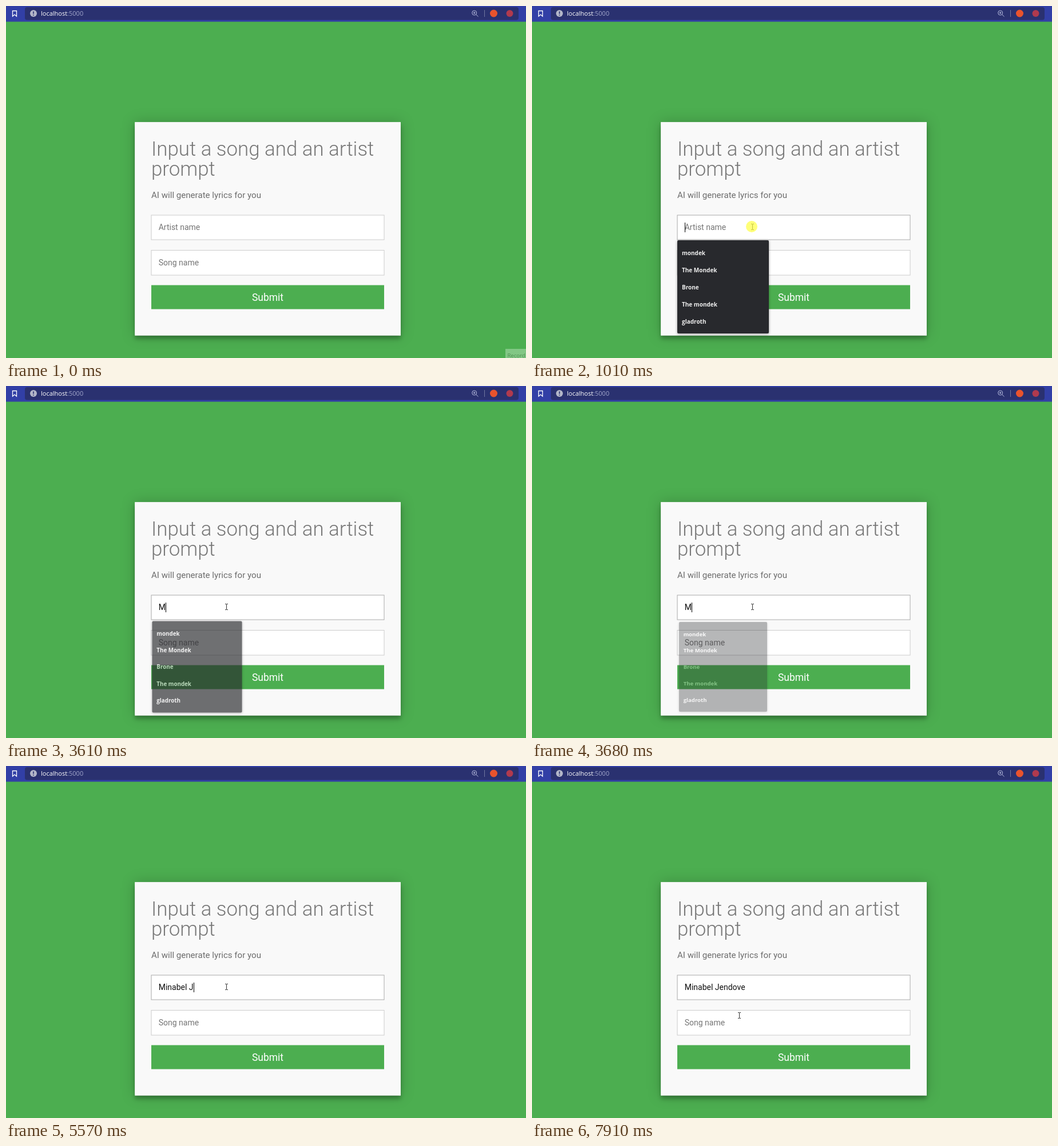
An HTML page that plays this animation: 909x616 px, repeating every 8 s.

```html
<!DOCTYPE html>
<html lang="en">
<head>
<meta charset="utf-8">
<title>Lyrics form</title>
<style>
  html, body { margin: 0; width: 100%; height: 100%; overflow: hidden; background: #4cae50; }
  svg { display: block; width: 909px; height: 616px; font-family: Roboto, sans-serif; }
  text { white-space: pre; }
  .ui { font-family: "Open Sans", sans-serif; }
  .card { fill: #f9f9f9; }
  .glow { filter: drop-shadow(0 0 11.5px rgba(0,0,0,.2)); }
  .drop { filter: drop-shadow(0 6px 3px rgba(0,0,0,.24)); }
  .field { fill: #fff; stroke: #ccc; }
  .field.focus { stroke: #aaa; }
  .entry { font-size: 14px; fill: #757575; }
  .title { font-size: 34.87px; font-weight: 300; fill: #777; }
  #menu { transform-origin: 334px 491.5px; font-size: 10px; font-weight: 700; fill: #eee; }
  #menu rect { fill: #28292d; filter: drop-shadow(0 1px 2px rgba(0,0,0,.4)); }
</style>
</head>
<body>
<svg viewBox="0 0 909 616">
  <rect width="909" height="616" fill="#4cae50"/>

  <g class="ui">
    <rect width="909" height="27.5" fill="#323fa6"/>
    <rect x="33" y="2" width="863" height="22.5" rx="4" fill="#2a3170"/>
    <path d="M11.5 8.5h7v9.5l-3.5-3-3.5 3z" fill="none" stroke="#fff" stroke-width="1.3"/>
    <circle cx="48" cy="13" r="6" fill="#b4b7c9"/>
    <path d="M48 9.5v4.3M48 15.2v1.5" stroke="#2a3170" stroke-width="1.6"/>
    <text x="61" y="17" font-size="11" fill="#fff">localhost<tspan fill="#a3a8cc">:5000</tspan></text>
    <g fill="none" stroke="#b4b9dc">
      <circle cx="818.7" cy="12" r="4"/>
      <path d="M821.7 15l3.8 3.6M816.7 12h4M818.7 10v4"/>
      <path d="M836.5 7v12" stroke="#70769f"/>
    </g>
    <circle cx="852.5" cy="13" r="6.5" fill="#e9532d"/>
    <circle cx="880.5" cy="13" r="6" fill="#b03a4e"/>
  </g>

  <rect class="card glow" x="225.3" y="203.3" width="464.6" height="373.3"/>
  <rect class="card drop" x="225.3" y="203.3" width="464.6" height="373.3"/>
  <text class="title" x="254" y="261.7">Input a song and an artist</text>
  <text class="title" x="254" y="296.5">prompt</text>
  <text x="254" y="336" font-size="15.1" fill="#6c6c6c">AI will generate lyrics for you</text>

  <rect id="artist" class="field" x="254" y="366" width="407" height="43"/>
  <text id="name" class="entry" x="266.7" y="392.3"></text>
  <rect id="caret" y="379" width="1" height="17"/>
  <rect class="field" x="254" y="427.5" width="407" height="43.5"/>
  <text class="entry" x="266.7" y="454.3">Song name</text>
  <rect x="254" y="488.5" width="407" height="42" fill="#4cae50"/>
  <text x="457.5" y="516" font-size="17.43" fill="#fff" text-anchor="middle">Submit</text>

  <g id="menu" class="ui">
    <rect x="254" y="410" width="160" height="163" rx="2"/>
  </g>

  <g id="record" class="ui">
    <rect x="873" y="600" width="36" height="16" fill="#fff" opacity=".3"/>
    <text x="876.5" y="614.5" font-size="9.5" fill="#4d8f50">Record</text>
  </g>

  <g id="cursor">
    <path id="beam" d="M-2.5 -5h2l.5 .5 .5 -.5h2M-2.5 5h2l.5 -.5 .5 .5h2M0 -4.5v9" fill="none" stroke="#333"/>
    <path id="arrow" d="M0 0v15l3.5-3.3 2.3 5.2 2.2-1-2.3-5h4.8z" fill="#fff" stroke="#222" stroke-width=".8"/>
    <circle id="click" cx="-1.5" cy="-.5" r="10" fill="#ffff40" opacity=".7"/>
  </g>
</svg>
<script>
const LOOP = 8000;
const ARTIST = "Minabel Jendove";
const KEYS = [3540, 3950, 4080, 4310, 4430, 4700, 4760, 5030, 5570, 5760, 6020, 6620, 6910, 7110, 7240];
const BLINKS = [1010, 1550, 2020, 2560, 3080];
const FOCUS = 1010, CLICK_END = 1070;
const $ = id => document.getElementById(id);
const show = (id, on) => $(id).setAttribute("display", on ? "inline" : "none");
const passed = (list, t) => list.filter(at => at <= t).length;
const lerp = (a, b, p) => a + (b - a) * p;

["mondek", "The Mondek", "Brone", "The mondek", "gladroth"].forEach((label, i) => {
  const row = document.createElementNS("http://www.w3.org/2000/svg", "text");
  row.setAttribute("x", 262);
  row.setAttribute("y", 435.5 + 30 * i);
  row.textContent = label;
  $("menu").append(row);
});

// Progress held in equal steps, reaching 1 at the last one
function stepped(t, start, end, steps) {
  const n = Math.floor((t - start) / (end - start) * (steps - 1) + 1e-6) + 1;
  return Math.max(0, Math.min(1, n / steps));
}

function drawField(t) {
  const typed = passed(KEYS, t);
  const name = $("name");
  name.textContent = typed ? ARTIST.slice(0, typed) : "Artist name";
  name.style.fill = typed ? "#111" : "";
  $("artist").classList.toggle("focus", t >= FOCUS);

  const width = typed ? name.getComputedTextLength() : 0;
  $("caret").setAttribute("x", Math.round(266.7 + width));
  show("caret", typed ? t - KEYS[typed - 1] < 530 : passed(BLINKS, t) % 2);
}

function drawMenu(t) {
  const alpha = 1 - stepped(t, 3610, 3750, 3);
  show("menu", t >= FOCUS && alpha > 0);
  $("menu").style.opacity = alpha;
  $("menu").style.transform = `scale(${1 - 0.055 * (1 - alpha)})`;
}

function drawCursor(t) {
  const enter = stepped(t, 70, 740, 10);
  const ease = enter * enter * (3 - 2 * enter);
  const leave = stepped(t, 7700, 7910, 4);
  const x = lerp(lerp(908, 385.5, ease), 362.5, leave);
  const y = lerp(lerp(612, 386.5, ease), 436.5, leave);
  const inField = x > 254 && x < 661 && (y > 366 && y < 409 || y > 427 && y < 471);
  $("cursor").setAttribute("transform", `translate(${x} ${y})`);
  show("cursor", t >= 70);
  show("beam", inField || leave > 0);
  show("arrow", !inField && !leave);
  show("click", t >= FOCUS && t < CLICK_END);
  show("record", t < 140);
}

function frame(now) {
  const t = now % LOOP;
  drawField(t);
  drawMenu(t);
  drawCursor(t);
  requestAnimationFrame(frame);
}
requestAnimationFrame(frame);
</script>
</body>
</html>
```
